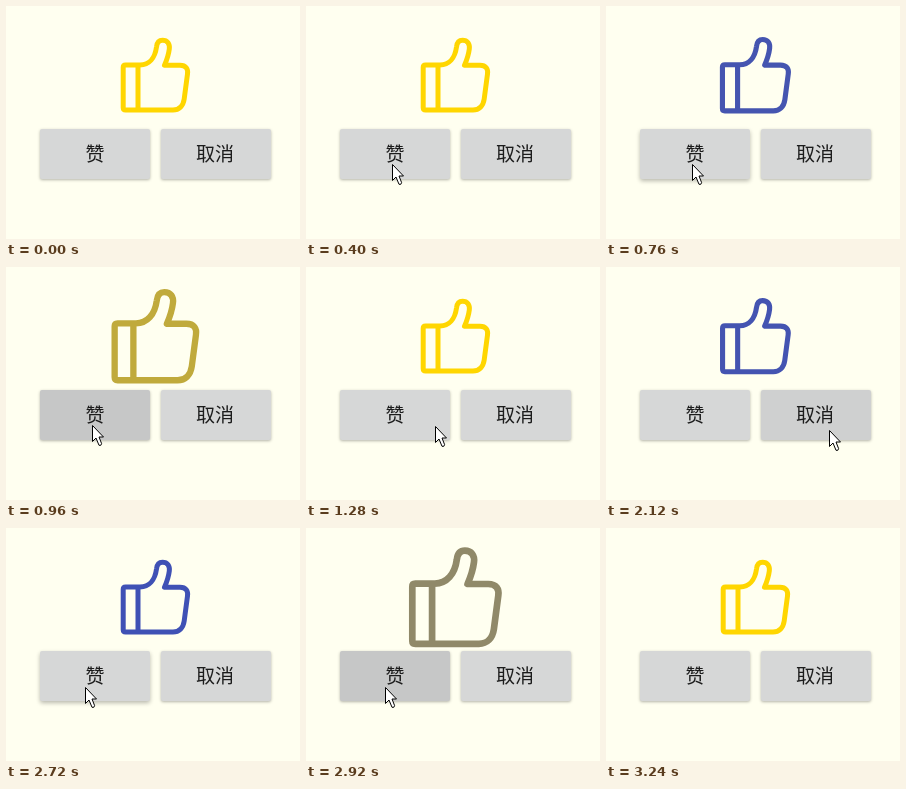
Animation of 294x233 px, one loop 3600 ms. Source, as an HTML page:

```html
<!DOCTYPE html>
<html lang="zh-CN">
<head>
<meta charset="utf-8">
<title>点赞</title>
<style>
  html, body { margin: 0; width: 100%; height: 100%; overflow: hidden; background: #fffff0; }
  #stage { position: absolute; left: 0; top: 0; width: 294px; height: 233px; overflow: hidden; }
  svg { position: absolute; left: 0; top: 0; }
  .btn {
    position: absolute; top: 122.5px; width: 110px; height: 50.5px;
    border-radius: 2px; overflow: hidden; background: #d6d7d7;
    box-shadow: 0 1px 3px rgba(0, 0, 0, .3);
    font: 19px/47px "Noto Sans CJK SC", "Noto Sans CJK", sans-serif;
    color: #1c1c1c; text-align: center;
  }
  .btn.lifted { box-shadow: 0 2px 4px rgba(0, 0, 0, .28); }
  .btn span { position: relative; }
  .btn i { position: absolute; border-radius: 50%; background: #000; opacity: 0; }
  #like { left: 34px; }
  #cancel { left: 154.5px; }
  #cancel span { left: -.5px; }
</style>
</head>
<body>
<div id="stage">
  <svg width="294" height="233" viewBox="0 0 294 233">
    <path id="thumb" fill="none" stroke-width="5" stroke-linejoin="round" d="
      M119.5 59 H134 C143 59 149 52 150.5 41 C151 36.5 153 34.3 156.5 34.3
      C161.5 34.3 164 38 163.3 43 C162.7 48 161 53.5 158.5 59.3 H174
      C180 59.3 182.3 63 181.5 68 L178.2 93 C177.2 100 173 104 167 104
      H119.5 Q117.2 104 117.2 101.7 V61.3 Q117.2 59 119.5 59 Z M132 59 V104"/>
  </svg>
  <div id="like" class="btn"><i></i><span>赞</span></div>
  <div id="cancel" class="btn"><i></i><span>取消</span></div>
  <svg width="294" height="233" viewBox="0 0 294 233">
    <path id="cursor" fill="#fff" stroke="#000" stroke-linejoin="round"
      d="M.5 .5 V16.5 L4 13 L7 20.3 H8.8 L9.6 18.6 L7 12 H11.5 Z"/>
  </svg>
</div>
<script>
const LOOP = 3600, STEP = 40, GROW = 400;
const YELLOW = [255, 214, 0], BLUE = [63, 81, 181];
const $ = id => document.getElementById(id);
const thumb = $("thumb"), cursor = $("cursor");

// Each click: animation start, button, colours, touch point inside the button.
const clicks = [
  { start: 716, btn: $("like"), from: BLUE, to: YELLOW, at: [52, 36] },
  { start: 1760, btn: $("cancel"), from: YELLOW, to: BLUE, at: [69, 40] },
  { start: 2740, btn: $("like"), from: BLUE, to: YELLOW, at: [45, 37] }
];

// Pointer tip: time, x, y
const path = [
  [40, 279, 50], [120, 200, 112], [200, 112, 163], [280, 64, 177], [400, 86, 158],
  [1200, 86, 158], [1320, 150, 160], [1400, 215, 161], [1440, 241, 161], [1520, 223, 163],
  [2280, 223, 163], [2320, 208, 164], [2440, 79, 159],
  [3120, 79, 159], [3200, 239, 100], [3239, 239, 100]
];

// Ripple: time since the animation start, opacity
const ripple = [[50, 0], [140, .075], [250, .075], [360, .033], [460, 0]];

const clamp = v => Math.min(1, Math.max(0, v));
const mix = (a, b, p) => a + (b - a) * p;
const ease = p => (1 - Math.cos(Math.PI * p)) / 2;

function sample(table, t) {
  const i = table.findIndex(row => row[0] > t);
  if (i < 0) return table[table.length - 1].slice(1);
  if (i === 0) return table[0].slice(1);
  const a = table[i - 1], b = table[i], p = (t - a[0]) / (b[0] - a[0]);
  return a.slice(1).map((v, k) => mix(v, b[k + 1], p));
}

function drawThumb(t) {
  const click = clicks.filter(c => t >= c.start).pop();
  let color = t >= 2440 ? BLUE : YELLOW, scale = 1;
  if (click) {
    const p = ease(clamp((t - click.start) / GROW));
    color = click.from.map((v, k) => Math.round(mix(v, click.to[k], p)));
    scale = 1 + .4 * (1 - Math.abs(2 * p - 1));
  }
  thumb.setAttribute("stroke", `rgb(${color})`);
  thumb.setAttribute("transform", `translate(149.5 69) scale(${scale}) translate(-149.5 -69)`);
}

function drawButton(btn, t) {
  const click = clicks.find(c => c.btn === btn && t >= c.start - 60 && t < c.start + 480);
  const dot = btn.firstChild, dt = click ? t - click.start : 0;
  btn.classList.toggle("lifted", !!click && dt < 160);
  dot.style.opacity = click ? sample(ripple, dt)[0] : 0;
  if (!click) return;
  const r = mix(20, 120, clamp((dt + 40) / 220));
  dot.style.width = dot.style.height = 2 * r + "px";
  dot.style.left = click.at[0] - r + "px";
  dot.style.top = click.at[1] - r + "px";
}

function drawCursor(t) {
  const shown = t >= 40 && t < 3240;
  cursor.style.display = shown ? "" : "none";
  const [x, y] = sample(path, t).map(Math.round);
  cursor.setAttribute("transform", `translate(${x} ${y})`);
}

function draw(time) {
  const t = Math.floor((time % LOOP) / STEP) * STEP;
  drawThumb(t);
  drawButton($("like"), t);
  drawButton($("cancel"), t);
  drawCursor(t);
}

const begin = performance.now();
function tick() {
  draw(performance.now() - begin);
  requestAnimationFrame(tick);
}
tick();
</script>
</body>
</html>
```
